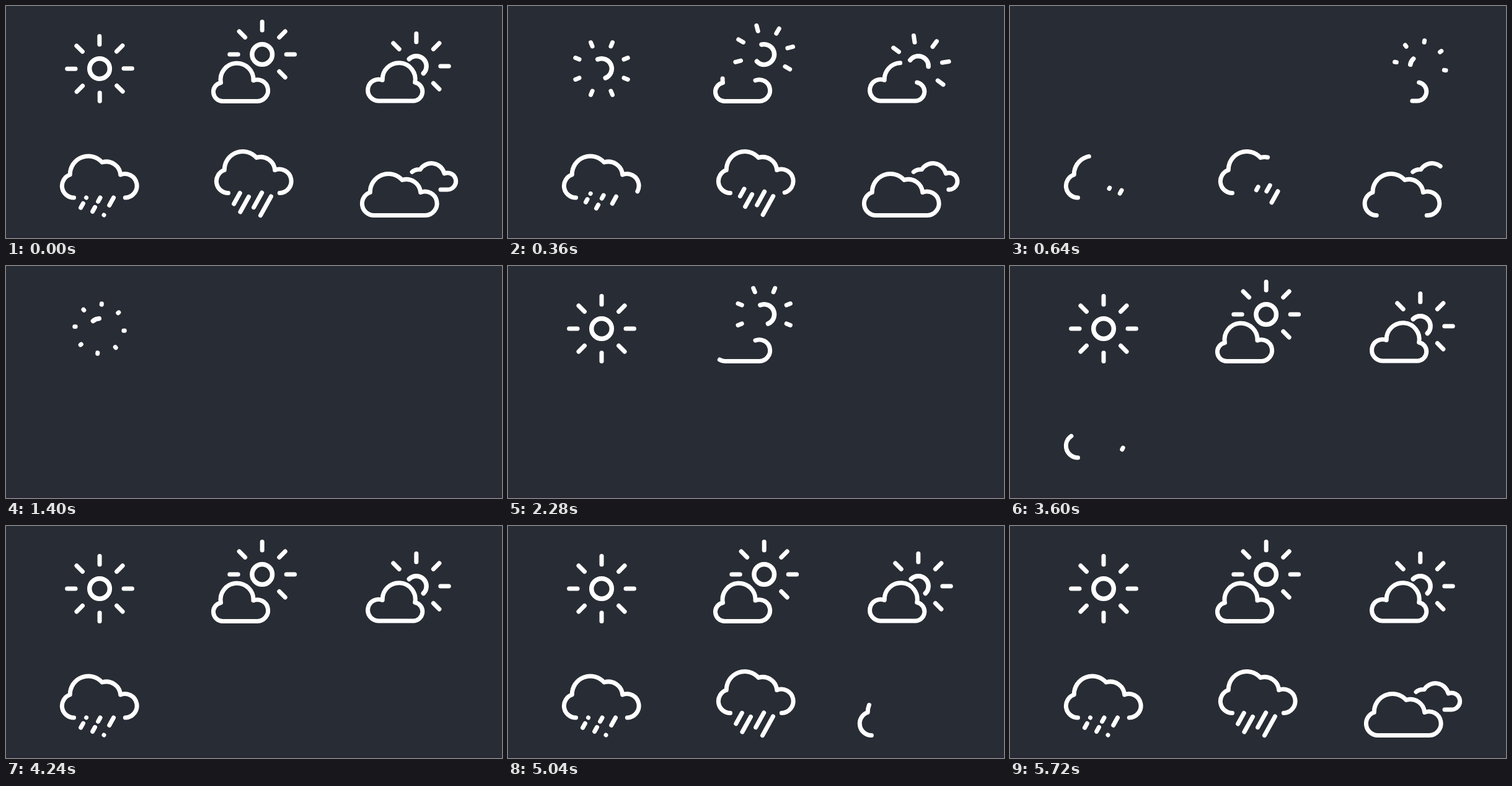
These frames come from a looping animation (800x374 px, 8.16 s). An HTML page:

```html
<!DOCTYPE html>
<html lang="en">
<head>
<meta charset="utf-8">
<title>Weather icons</title>
<style>
  html, body { margin: 0; width: 100%; height: 100%; overflow: hidden; background: #282c34; }
  svg { display: block; width: 800px; height: 374px; }
  .ink { fill: none; stroke: #fff; stroke-width: 7; stroke-linecap: round; stroke-linejoin: round; }
</style>
</head>
<body>
<svg viewBox="0 0 800 374">
  <rect y="370" width="800" height="4" fill="#292a36"/>
  <g class="ink" id="stage"></g>
</svg>
<script>
const LOOP = 8160, STEP = 40, SPAN = 600;
const stage = document.getElementById('stage');
const parts = [];

function add(tag, attrs, parent = stage) {
  const el = document.createElementNS('http://www.w3.org/2000/svg', tag);
  for (const key in attrs) el.setAttribute(key, attrs[key]);
  parent.appendChild(el);
  return el;
}

// Each part belongs to an icon slot; late parts enter later and leave earlier.
function part(slot, delay, el, draw) {
  parts.push({ slot, delay, el, draw });
}

function reveal(el, p) {
  el.setAttribute('stroke-dasharray', `${p} 2`);
}

function outline(slot, d, { x = 0, y = 0, drift = 0, delay = 0 } = {}) {
  const el = add('path', { d, pathLength: 1 });
  part(slot, delay, el, p => {
    reveal(el, p);
    el.setAttribute('transform', `translate(${x - drift * (1 - p)} ${y})`);
  });
}

function sun(slot, cx, cy, angles, from, sweep) {
  const g = add('g', {});
  const r = 16.3;
  const at = deg => {
    const a = deg * Math.PI / 180;
    return `${r * Math.sin(a)} ${-r * Math.cos(a)}`;
  };
  const arc = deg => `A${r} ${r} 0 0 1 ${at(deg)}`;
  const disc = add('path', {
    d: `M${at(from)}${arc(from + sweep / 2)}${arc(from + sweep)}`,
    pathLength: 1, 'stroke-width': 7.5
  }, g);
  const rays = angles.map(a => add('line', { y1: -39, transform: `rotate(${a})` }, g));
  part(slot, 0, g, p => {
    g.setAttribute('transform', `translate(${cx} ${cy}) rotate(${-45 * (1 - p)})`);
    reveal(disc, p);
    for (const ray of rays) ray.setAttribute('y2', -39 - 13.4 * p);
  });
}

// A falling streak: dashes are [start, end] distances from its top.
function streak(slot, delay, x, y, dashes) {
  const el = add('path', {});
  const length = dashes[dashes.length - 1][1];
  const point = s => `${x - 0.485 * s} ${y + 0.875 * s}`;
  part(slot, delay, el, p => {
    el.setAttribute('transform', `translate(${11 * (1 - p)} ${-20 * (1 - p)})`);
    el.setAttribute('d', dashes
      .filter(([a]) => a <= p * (length + 2))
      .map(([a, b]) => `M${point(a)}L${point(a + (b - a) * p + 0.01)}`)
      .join(''));
  });
}

const smallCloud = 'M399 120A17.3 17.3 0 1 1 405.5 153.4H350A15 15 0 0 1 346.5 123.7A26.5 26.5 0 1 1 399 120';
const mirrorCloud = 'M659.7 123.2A15 15 0 0 1 656.2 152.9H600.7A17.3 17.3 0 1 1 607.2 119.5A26.5 26.5 0 1 1 659.7 123.2';
const bigCloud = 'M109.5 309A19 19 0 0 1 103.3 272A29.5 29.5 0 0 1 155 252A23 23 0 0 1 184.7 272A19.2 19.2 0 1 1 192.3 309';
const backCloud = 'M655 267.5Q660 263 668 263.5A21.5 21.5 0 0 1 707 270A13.5 13.5 0 1 1 712 296H701';

sun(0, 151, 101, [0, 45, 90, 135, 180, 225, 270, 315], 0, 360);

sun(1, 413.2, 78, [0, 45, 90, 135, 270, 315], 0, 360);
outline(1, smallCloud);

sun(2, 661.8, 97, [0, 45, 90, 135, 315], -45, 180);
outline(2, mirrorCloud);

outline(3, bigCloud);
streak(3, 0, 173.5, 309, [[0, 14], [32, 32]]);
streak(3, 80, 152, 309, [[0, 7], [17.5, 25.5]]);
streak(3, 160, 129.5, 309, [[0, 0], [10.5, 18.5]]);

outline(4, bigCloud, { x: 249, y: -7.5 });
streak(4, 0, 427.5, 307, [[0, 35]]);
streak(4, 80, 412.7, 301, [[0, 27]]);
streak(4, 160, 391.5, 307.5, [[0, 28]]);
streak(4, 240, 377.3, 301.5, [[0, 20]]);

outline(5, bigCloud + 'Z', { x: 484, y: 28.5, drift: 9 });
outline(5, backCloud, { drift: 9, delay: 160 });

function progress(t, slot, delay) {
  const enter = 1360 + 720 * slot + delay;
  const leave = -40 + 80 * slot - delay;
  const turn = start => Math.min(1, Math.max(0, (t - start) / SPAN)) * Math.PI / 2;
  return t < enter ? Math.cos(turn(leave)) : Math.sin(turn(enter));
}

function render(t) {
  for (const { slot, delay, el, draw } of parts) {
    const p = progress(t, slot, delay);
    const shown = p > 0.001;
    el.setAttribute('visibility', shown ? 'visible' : 'hidden');
    if (shown) draw(p);
  }
}

const begin = performance.now();
function tick() {
  const t = (performance.now() - begin) % LOOP;
  render(Math.floor(t / STEP) * STEP);
  requestAnimationFrame(tick);
}
tick();
</script>
</body>
</html>
```
